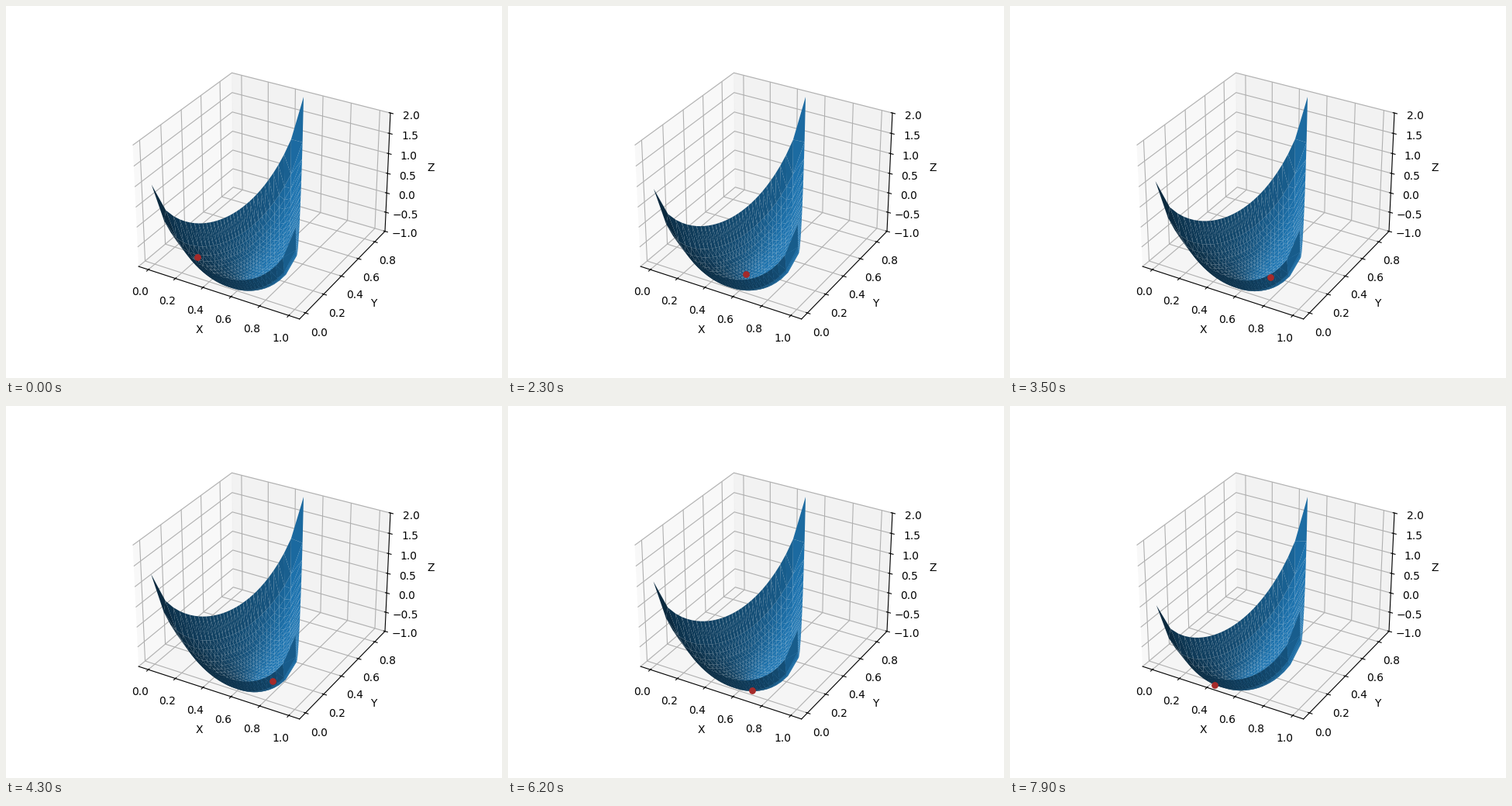
A matplotlib script that plays this animation: 640 px wide and 480 px high, repeating every 8 s.

```python
import numpy as np
import matplotlib.pyplot as plt
import matplotlib.tri as tri
from matplotlib.animation import FuncAnimation

FRAMES, STEP_MS = 80, 100
HEIGHT = np.sqrt(3) / 2
CORNERS = np.array([[0, 0], [1, 0], [0.5, HEIGHT]])


def barycentric(x, y):
    w3 = y / HEIGHT
    w2 = x - w3 / 2
    return np.clip(np.stack([1 - w2 - w3, w2, w3], axis=-1), 0, 1)


def surface(weights, tilt):
    """Tilted cost minus a concave power of the entropy."""
    w1, w2, w3 = np.moveaxis(weights, -1, 0)
    safe = np.clip(weights, 1e-12, 1)
    entropy = -(safe * np.log(safe)).sum(axis=-1)
    cost = 1 + tilt * w1 - 0.75 * tilt * w2 + w3 - w3**2 * (1 - w3)
    return cost - 2.45 * np.abs(entropy) ** 0.88


def tilt_at(t):
    """Rocking that grows with time."""
    return 0.065 * t * np.cos(0.95 * (t - 4.75))


def dot_at(t):
    """Slow loop over the triangle."""
    x = 0.445 + 0.235 * np.cos(0.62 * (t - 4.8))
    y = 0.18 + 0.12 * np.cos(0.62 * (t - 3.1))
    return x, y


def graded_mesh():
    """Refined triangle whose cells shrink towards the centre."""
    base = tri.Triangulation(CORNERS[:, 0], CORNERS[:, 1], [[0, 1, 2]])
    fine = tri.UniformTriRefiner(base).refine_triangulation(subdiv=5)
    w = barycentric(fine.x, fine.y) ** 0.7
    w /= w.sum(axis=1, keepdims=True)
    return tri.Triangulation(*(w @ CORNERS).T, fine.triangles), w


mesh, mesh_weights = graded_mesh()

fig = plt.figure(figsize=(6.4, 4.8), dpi=100)
ax = fig.add_subplot(projection="3d", computed_zorder=False)
pad = 0.05 + 1.1 / 48
ax.set_xlim(-pad, 1 + pad)
ax.set_ylim(-pad * HEIGHT, (1 + pad) * HEIGHT)
ax.set_zlim(-1, 2)
ax.set_xlabel("X")
ax.set_ylabel("Y")
ax.set_zlabel("Z")

artists = []


def update(i):
    while artists:
        artists.pop().remove()
    t = i * STEP_MS / 1000
    tilt = tilt_at(t)
    x, y = dot_at(t)
    z = surface(barycentric(x, y), tilt)
    artists.append(ax.plot_trisurf(mesh, surface(mesh_weights, tilt),
                                   color="C0", zorder=1))
    artists.append(ax.scatter([x], [y], [z], s=28, color="brown",
                              depthshade=False, zorder=5))
    return artists


anim = FuncAnimation(fig, update, frames=FRAMES, init_func=lambda: [],
                     interval=STEP_MS, repeat=True, repeat_delay=0)
plt.show()
```
